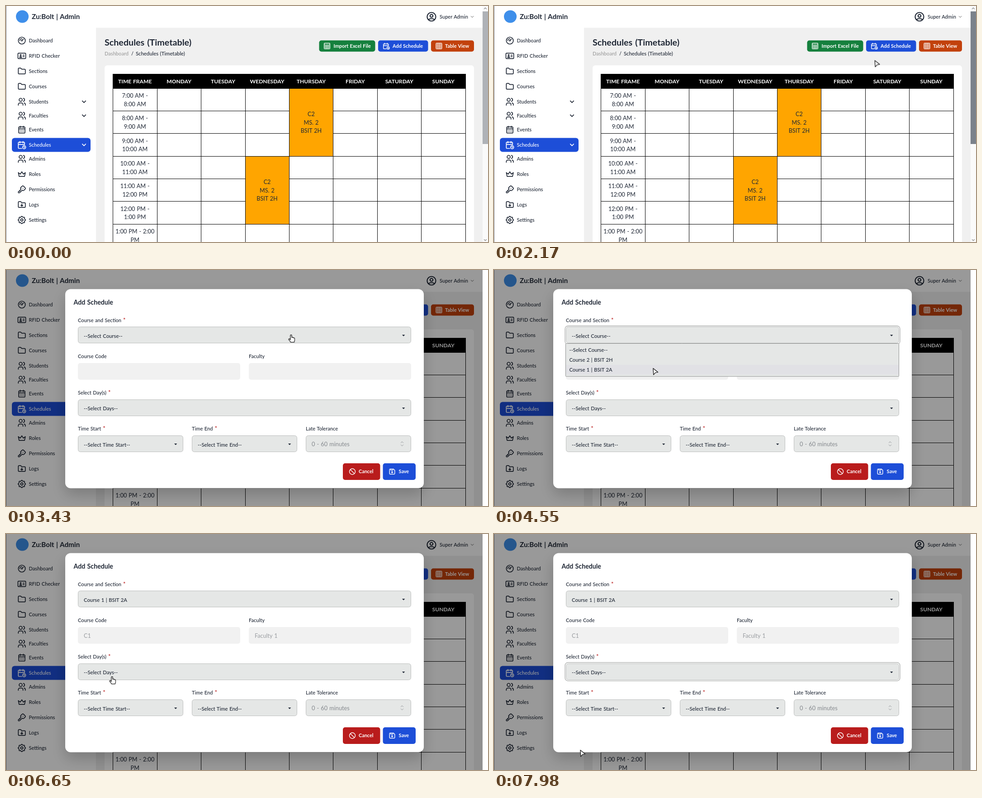
Write an HTML page that moves like this. It is 1066 px wide and 525 px high and loops after 8000 ms.

```html
<!DOCTYPE html>
<html lang="en">
<head>
<meta charset="utf-8">
<title>Schedules</title>
<style>
html, body { margin: 0; width: 100%; height: 100%; overflow: hidden; background: #fff; }
svg { display: block; width: 100%; height: 100%; }
text { font-family: Lato, "Open Sans", sans-serif; word-spacing: .06em; white-space: pre; }

#cursor, #arrow, #hand, #bar, #thumb, #modal, #box, #add, .pop, .mark {
  animation: 8s linear infinite;
}
#cursor { animation-name: move, enter; animation-timing-function: linear, step-end; }
#arrow { animation-name: arrow; animation-timing-function: step-end; }
#hand { animation-name: hand; animation-timing-function: step-end; }
#bar { animation-name: bar; animation-timing-function: step-end; }
#thumb { animation-name: thumb; }
#modal { animation-name: fade; }
#box { animation-name: grow; transform-origin: 527.5px 264px; }
#add { animation-name: press; transform-origin: 878px 89px; }
.pop { animation-timing-function: step-end; }
#ring1 { animation-name: ring1; }
#ring2 { animation-name: ring2; }
#list1 { animation-name: list1; }
#list2 { animation-name: list2; }
#empty { animation-name: empty; }
#chosen { animation-name: chosen; }
#filled { animation-name: filled; }
#list1 .mark { animation-name: mark1; animation-timing-function: step-end; }
#list2 .mark { animation-name: mark2; }
#panel { filter: drop-shadow(0 14px 16px rgba(0, 0, 0, .2)); }

@keyframes enter { 0% { opacity: 0 } 5.25%, 100% { opacity: 1 } }
@keyframes move {
  0%, 5.2% { transform: translate(1060px, 510px) }
  7% { transform: translate(1006px, 470px) }
  9.6% { transform: translate(1004px, 284px) }
  12.25% { transform: translate(800px, 196px) }
  14.9%, 15.2% { transform: translate(713px, 212px) }
  16.6%, 20.6% { transform: translate(690px, 246px) }
  23.6%, 24.9% { transform: translate(803px, 170px) }
  27.1% { transform: translate(841px, 121px) }
  28.9%, 38.5% { transform: translate(855px, 94.5px) }
  42.85%, 50% { transform: translate(630.5px, 144px) }
  56.85%, 67.5% { transform: translate(351px, 218px) }
  72.6% { transform: translate(280px, 338px) }
  77.9%, 81.4% { transform: translate(230px, 323px) }
  83.1%, 87.5% { transform: translate(234.5px, 317px) }
  95.35%, 100% { transform: translate(190px, 480px) }
}
@keyframes arrow {
  0% { opacity: 1 } 28.2% { opacity: 0 } 33.4% { opacity: 1 } 41.3% { opacity: 0 }
  51.8% { opacity: 1 } 77.4% { opacity: 0 } 87.9%, 100% { opacity: 1 }
}
@keyframes hand {
  0% { opacity: 0 } 28.2% { opacity: 1 } 33.4% { opacity: 0 } 41.3% { opacity: 1 }
  51.8% { opacity: 0 } 77.4% { opacity: 1 } 87.9%, 100% { opacity: 0 }
}
@keyframes bar { 0% { opacity: 1 } 33.4%, 100% { opacity: 0 } }
@keyframes thumb { 0%, 5.25% { fill: #afb2b7 } 7%, 100% { fill: #7b828b } }
@keyframes fade {
  0% { opacity: 0 }
  33.5% { opacity: 0; animation-timing-function: cubic-bezier(0, 0, .2, 1) }
  36%, 100% { opacity: 1 }
}
@keyframes grow {
  0% { transform: scale(.9) }
  33.5% { transform: scale(.9); animation-timing-function: cubic-bezier(0, 0, .2, 1) }
  36%, 100% { transform: scale(1) }
}
@keyframes press {
  0%, 32% { transform: scale(1) }
  32.4%, 34.4% { transform: scale(.98) }
  35.4%, 100% { transform: scale(1) }
}
@keyframes ring1 { 0% { opacity: 0 } 47.25% { opacity: 1 } 68.25%, 100% { opacity: 0 } }
@keyframes ring2 { 0% { opacity: 0 } 84.875%, 100% { opacity: 1 } }
@keyframes list1 { 0% { opacity: 0 } 47.25% { opacity: 1 } 66.5%, 100% { opacity: 0 } }
@keyframes list2 { 0% { opacity: 0 } 84.875% { opacity: 1 } 99.75%, 100% { opacity: 0 } }
@keyframes empty { 0% { opacity: 1 } 66.5%, 100% { opacity: 0 } }
@keyframes chosen { 0% { opacity: 0 } 66.5%, 100% { opacity: 1 } }
@keyframes filled { 0% { opacity: 0 } 68.25%, 100% { opacity: 1 } }
@keyframes mark1 {
  0% { transform: translateY(0) }
  54.2% { transform: translateY(21.75px) }
  56.2%, 100% { transform: translateY(43.5px) }
}
@keyframes mark2 {
  0% { transform: translateY(0) }
  88.05% { transform: translateY(0); animation-timing-function: steps(6, end) }
  94.35%, 100% { transform: translateY(130.5px) }
}
</style>
</head>
<body>
<svg id="stage" viewBox="0 0 1066 525" xmlns="http://www.w3.org/2000/svg"></svg>
<script>
const INK = '#1f2735', BLUE = '#1d4ed8', FIELD = '#e5e7e6';

// y is the middle of the capitals
const text = (x, y, str, size = 11.1, o = {}) =>
  `<text x="${x}" y="${(y + size * .36).toFixed(2)}" font-size="${size}" font-weight="${o.w || 500}"` +
  ` fill="${o.c || INK}" text-anchor="${o.a || 'start'}">${str}</text>`;
const rect = (x, y, w, h, fill, r = 0, more = '') =>
  `<rect x="${x}" y="${y}" width="${w}" height="${h}" rx="${r}" fill="${fill}" ${more}/>`;
const line = (d, color, w = 1.5) =>
  `<path d="${d}" fill="none" stroke="${color}" stroke-width="${w}" stroke-linecap="round" stroke-linejoin="round"/>`;
const group = (id, body, cls = '') => `<g id="${id}" class="${cls}">${body}</g>`;
const ring = (x, y, r) => `M${x - r} ${y}a${r} ${r} 0 1 0 ${2 * r} 0a${r} ${r} 0 1 0 ${-2 * r} 0`;

const gear = () => {
  let d = '';
  for (let i = 0; i < 96; i++) {
    const a = i / 96 * 2 * Math.PI, r = 8.5 + Math.cos(8 * a);
    d += (i ? 'L' : 'M') + (12 + r * Math.sin(a)).toFixed(2) + ' ' + (12 - r * Math.cos(a)).toFixed(2);
  }
  return d + 'z' + ring(12, 12, 3);
};
const folder = 'M5 4h4l3 3h7a2 2 0 0 1 2 2v8a2 2 0 0 1-2 2H5a2 2 0 0 1-2-2V6a2 2 0 0 1 2-2';
const icons = {
  gauge: ring(12, 12, 9) + ring(12, 12, 1) + 'M13.4 10.6L16 8M7 12a5 5 0 0 1 5-5',
  card: 'M4 5h16a2 2 0 0 1 2 2v10a2 2 0 0 1-2 2H4a2 2 0 0 1-2-2V7a2 2 0 0 1 2-2zM6.5 16c0-3 5-3 5 0z' +
    ring(9, 10, 1.5) + 'M15 10h3M15 14h3',
  folder,
  users: ring(9, 7, 4) + 'M3 21v-2a4 4 0 0 1 4-4h4a4 4 0 0 1 4 4v2M16 3.1a4 4 0 0 1 0 7.8M21 21v-2a4 4 0 0 0-3-3.9',
  month: 'M6 5h12a2 2 0 0 1 2 2v12a2 2 0 0 1-2 2H6a2 2 0 0 1-2-2V7a2 2 0 0 1 2-2zM16 3v4M8 3v4M4 10h16' +
    'M8 14h0M12 14h0M16 14h0M8 17.5h0M12 17.5h0M16 17.5h0',
  time: 'M11.8 21H5a2 2 0 0 1-2-2V7a2 2 0 0 1 2-2h12a2 2 0 0 1 2 2v4' + ring(18, 18, 4) +
    'M15 3v4M7 3v4M3 11h16M18 16.5V18l1 1',
  crown: 'M12 6l4 6l5-4l-2 10H5L3 8l5 4z',
  key: 'M16.6 3.8l3.6 3.6a2.9 2.9 0 0 1 0 4.1l-2.7 2.6a2.9 2.9 0 0 1-4 0l-.3-.3l-6.6 6.6a2 2 0 0 1-1.4 .6H4' +
    'a1 1 0 0 1-1-1v-1.2a2 2 0 0 1 .6-1.4l.4-.4h2v-2h2v-2l2.1-2.1l-.3-.3a2.9 2.9 0 0 1 0-4.1l2.7-2.6a2.9 2.9 0 0 1 4.1 0zM15 9h0',
  logs: folder + 'M12 10v6M9.5 13.5L12 16l2.5-2.5',
  gear: gear(),
  user: ring(12, 12, 9) + ring(12, 10, 3) + 'M6.2 18.8a4 4 0 0 1 3.8-2.8h4a4 4 0 0 1 3.8 2.8',
  grid: 'M5 3h14a2 2 0 0 1 2 2v14a2 2 0 0 1-2 2H5a2 2 0 0 1-2-2V5a2 2 0 0 1 2-2zM3 9h18M3 15h18M9 3v18M15 3v18',
  sheet: 'M5 3h14a2 2 0 0 1 2 2v14a2 2 0 0 1-2 2H5a2 2 0 0 1-2-2V5a2 2 0 0 1 2-2zM3 9h18M3 15h18M9 9v12M15 9v12',
  ban: ring(12, 12, 9) + 'M5.7 5.7l12.6 12.6',
  save: 'M6 4h10l4 4v10a2 2 0 0 1-2 2H6a2 2 0 0 1-2-2V6a2 2 0 0 1 2-2' + ring(12, 14, 2) + 'M14 4v4H8V4'
};
const icon = (name, x, y, s, color = INK) =>
  `<g transform="translate(${x} ${y}) scale(${s}) translate(-12 -12)">${line(icons[name], color, 2)}</g>`;
const chevron = (x, y, r, color, w) => line(`M${x - r} ${y - r / 2}l${r} ${r}l${r} ${-r}`, color, w);
const button = (x, y, w, h, color, name, label, ix, tx, s = .7) =>
  rect(x, y, w, h, color, 5) + icon(name, ix, y + h / 2, s, '#fff') +
  text(tx, y + h / 2, label, 10.9, { w: 700, c: '#fff' });

function sidebar() {
  const items = [
    ['Dashboard', 'gauge', 77], ['RFID Checker', 'card', 111], ['Sections', 'folder', 145],
    ['Courses', 'folder', 179], ['Students', 'users', 213, 1], ['Faculties', 'users', 244, 1],
    ['Events', 'month', 275], ['Schedules', 'time', 309, 1], ['Admins', 'users', 340],
    ['Roles', 'crown', 374], ['Permissions', 'key', 408], ['Logs', 'logs', 442], ['Settings', 'gear', 476]
  ];
  return rect(13, 293.5, 174, 31, BLUE, 6) + items.map(([label, name, y, more]) => {
    const c = label === 'Schedules' ? '#fff' : INK;
    return icon(name, 35, y, .86, c) + text(50.5, y, label, 11.1, { c }) +
      (more ? chevron(172.5, y, 3.7, c, 1.7) : '');
  }).join('');
}

function header() {
  return '<circle cx="36" cy="23.5" r="14" fill="#3f8fea"/>' +
    text(57, 24, 'Zu:Bolt | Admin', 15.2, { w: 700 }) +
    icon('user', 941, 24, 1.06) + text(959, 24, 'Super Admin') + chevron(1031.2, 24, 2.8, '#555', 1);
}

function table() {
  // lines sit on whole pixels
  const colX = k => Math.round(236.3 + 97.43 * k) + .5;
  const rowY = k => Math.floor(183 + 50.35 * k) + .5;
  const mid = k => 285.2 + 97.43 * k;
  const hour = h => `${(h + 11) % 12 + 1}:00 ${h < 12 ? 'AM' : 'PM'}`;
  const center = { a: 'middle', w: 400 };
  const edge = 'stroke="#000"';
  let out = rect(236, 151, 781, 32, '#000');
  ['TIME FRAME', 'MONDAY', 'TUESDAY', 'WEDNESDAY', 'THURSDAY', 'FRIDAY', 'SATURDAY', 'SUNDAY'].forEach((d, k) => {
    out += text(mid(k), 167.5, d, 12.1, { w: 700, c: '#fff', a: 'middle' });
  });
  let d = '';
  for (let k = 0; k < 9; k++) d += `M${colX(k)} 183V525`;
  for (let k = 0; k < 7; k++) d += `M${colX(0)} ${rowY(k)}H${colX(8)}`;
  out += `<path d="${d}" ${edge}/>`;
  for (let k = 0; k < 7; k++) {
    const y = 199.4 + 50.33 * k;
    const [a, b] = k < 6 ? [hour(7 + k) + ' -', hour(8 + k)] : ['1:00 PM - 2:00', 'PM'];
    out += text(mid(0), y, a, 12.6, center) + text(mid(0), y + 18.6, b, 12.6, center);
  }
  [[4, 0], [3, 3]].forEach(([col, row]) => {
    const x = colX(col), y = rowY(row);
    out += rect(x, y, colX(col + 1) - x, rowY(row + 3) - y, '#ffa500', 0, edge);
    ['C2', 'MS. 2', 'BSIT 2H'].forEach((s, i) => {
      out += text(mid(col), y + 57 + 18.7 * i, s, 12.6, center);
    });
  });
  return out;
}

function page() {
  return rect(0, 0, 1066, 525, '#fff') + rect(199, 48.5, 855, 477, '#f0f0f0') +
    rect(0, 0, 1, 525, '#8a8f98') + header() + sidebar() +
    text(218, 80.5, 'Schedules (Timetable)', 19.7, { w: 700 }) +
    text(218, 106, 'Dashboard', 11.1, { c: '#9b9b9b' }) + text(277, 106, '/') +
    text(287, 106, 'Schedules (Timetable)', 11.3) +
    button(692.5, 76.5, 124, 25, '#15803d', 'sheet', 'Import Excel File', 710, 724.5) +
    group('add', button(823, 76.5, 110.5, 25, BLUE, 'time', 'Add Schedule', 841, 855)) +
    button(940, 76.5, 95, 25, '#c2410c', 'grid', 'Table View', 957.5, 971) +
    rect(218, 132, 817, 410, '#fff', 6) + table() +
    group('bar', rect(1054, 0, 12, 525, '#fafafa') + rect(1054, 12, 12, 295, '#afb2b7', 0, 'id="thumb"') +
      line('M1057.5 6.5l2.5-2.5l2.5 2.5M1057.5 519.5l2.5 2.5l2.5-2.5', '#8a8a8a', 1.2));
}

const label = (x, y, str, must) =>
  text(x, y, str + (must ? '<tspan dx="4" fill="#b91c1c" font-size="13">*</tspan>' : ''), 11.1);
const field = (x, y, w) => rect(x + .5, y + .5, w - 1, 36, FIELD, 5, 'stroke="#bcbebd"');
const select = (x, y, w, str) => field(x, y, w) + str +
  `<path d="M${x + w - 20} ${y + 18}h6.4l-3.2 3.6z" fill="${INK}"/>`;
const prompt = (x, y, str) => text(x + 13, y + 20.5, str, 11.3);
const focus = y => rect(157, y - 1.8, 741, 41.2, '#fff', 7, 'stroke="#b3b5b4" stroke-width="1.4"');

function list(id, top, options) {
  const rh = 21.75;
  return group(id,
    rect(158.5, top + .5, 737, options.length * rh + 8, FIELD, 1, 'stroke="#8f9190"') +
    rect(159, top + 4, 736, rh, '#e1e1e5', 0, 'class="mark"') +
    options.map((s, i) => text(166.5, top + 15 + rh * i, s, 11.2)).join(''), 'pop');
}

function modal() {
  const grey = { c: '#9a9da1', w: 400 };
  const box = rect(131, 42.5, 793, 443, '#fff', 12, 'id="panel"') +
    text(149.5, 72, 'Add Schedule', 14.2, { w: 700 }) +
    label(159, 111.5, 'Course and Section', 1) +
    label(159, 192, 'Course Code') + label(537, 192, 'Faculty') +
    label(159, 272.5, 'Select Day(s)', 1) +
    label(159, 353, 'Time Start', 1) + label(411, 353, 'Time End', 1) + label(663, 353, 'Late Tolerance') +
    group('ring1', focus(126), 'pop') + group('ring2', focus(287.5), 'pop') +
    select(159, 126, 737, group('empty', prompt(159, 126.5, '--Select Course--'), 'pop') +
      group('chosen', prompt(159, 126.5, 'Course 1 | BSIT 2A'), 'pop')) +
    rect(159, 207, 359, 37, '#f1f1f1', 5) + rect(537, 207, 359, 37, '#f1f1f1', 5) +
    group('filled', text(172, 226, 'C1', 12.6, grey) + text(550, 226, 'Faculty 1', 12.6, grey), 'pop') +
    select(159, 288, 737, prompt(159, 287.5, '--Select Days--')) +
    select(159, 368, 233, prompt(159, 368, '--Select Time Start--')) +
    select(411, 368, 233, prompt(411, 368, '--Select Time End--')) +
    field(663, 368, 233) + text(676, 387, '0 - 60 minutes', 12.8, { c: '#85898e', w: 400 }) +
    line('M873.3 384.5l2.7-2.7l2.7 2.7M873.3 388.8l2.7 2.7l2.7-2.7', '#8f9296', 1) +
    button(745, 430, 82.5, 37, '#b91c1c', 'ban', 'Cancel', 766, 780, .72) +
    button(833.5, 430, 72.5, 37, BLUE, 'save', 'Save', 854, 868.5, .72) +
    list('list1', 163, ['--Select Course--', 'Course 2 | BSIT 2H', 'Course 1 | BSIT 2A']) +
    list('list2', 324.5, ['--Select Days--', 'Monday', 'Tuesday', 'Wednesday', 'Thursday', 'Friday', 'Saturday', 'Sunday']);
  return group('modal', rect(0, 0, 1054, 525, 'rgba(0,0,0,.4)') + group('box', box));
}

function cursor() {
  const shape = (id, d) =>
    `<path id="${id}" d="${d}" fill="#fff" stroke="#222" stroke-width="1.4" stroke-linejoin="round"/>`;
  return group('cursor',
    shape('arrow', 'M1 .8L11.6 9.4L6 10.4L1.8 15z') +
    shape('hand', 'M-1.5 1.8a1.5 1.5 0 0 1 3 0V6a1.4 1.4 0 0 1 2.5 .5a1.4 1.4 0 0 1 2.2 .8a1.2 1.2 0 0 1 1.8 1V12' +
      'c0 2-1 2.3-1.2 4.6H-1c-.5-2-3.6-4.4-4.2-6.1c-.4-1.4 1.2-2 2.2-.8L-1.5 11z'));
}

document.getElementById('stage').innerHTML = page() + modal() + cursor();
</script>
</body>
</html>
```
